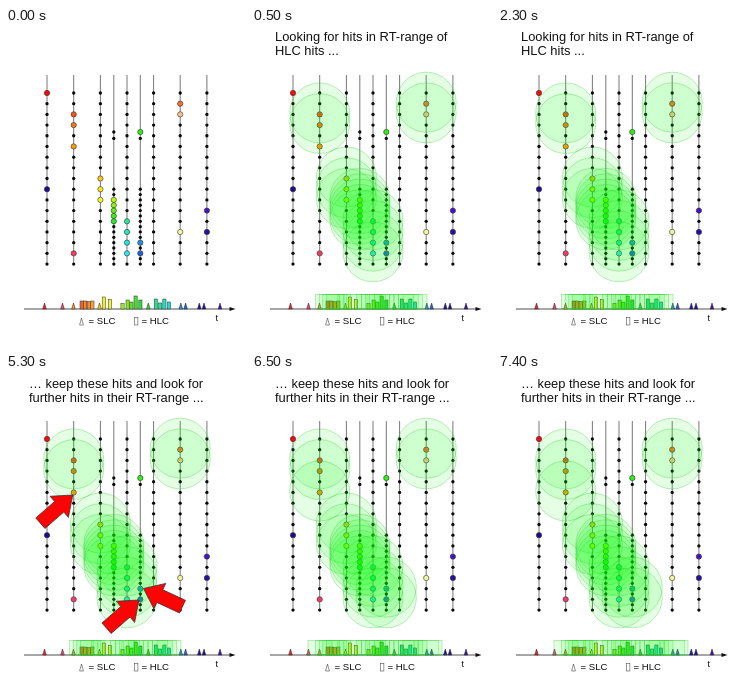
An HTML page that plays this animation: 240 px wide and 318 px high, repeating every 8000 ms.

```html
<!DOCTYPE html>
<html lang="en">
<head>
<meta charset="utf-8">
<title>RT-range hit cleaning</title>
<style>
html, body { margin: 0; width: 100%; height: 100%; overflow: hidden; background: #fff; }
svg { display: block; width: 100vw; height: 100vh; }
text { font-family: "Liberation Sans", Arial, sans-serif; fill: #111; }
</style>
</head>
<body>
<svg id="stage" viewBox="0 0 240 318"></svg>
<script>
const LOOP = 8000, LOOK = 500, KEEP = 3500, EXTEND = 6500;
const RANGE = 30, LIFT = 1.5, WINDOW = 12, AXIS = 281;
const stage = document.getElementById('stage');

function add(parent, tag, attrs, text) {
  const el = document.createElementNS('http://www.w3.org/2000/svg', tag);
  for (const k in attrs) el.setAttribute(k, attrs[k]);
  if (text) el.textContent = text;
  parent.appendChild(el);
  return el;
}
const group = () => add(stage, 'g', {});
const row = n => 65 + n * 10.69;

// Detector strings; the two dense ones have closely spaced modules
const columns = [41, 67.7, 94.4, 107.8, 121, 134.3, 147.6, 174.2, 200.9];
const dense = [3, 5];

// [column, row, colour, is HLC]
const hits = [
  [0, 0, '#fc0808'], [0, 9, '#1c0a90'],
  [1, 2, '#f8501c', 1], [1, 3, '#f87414', 1], [1, 5, '#fc9808'], [1, 15, '#f43a68'],
  [2, 8, '#fcc41c', 1], [2, 9, '#fce41c', 1], [2, 10, '#f8f820', 1],
  [3, 10, '#b4f810', 1], [3, 10.5, '#8cf410', 1], [3, 11, '#60f014', 1],
  [3, 11.5, '#40ec1c', 1], [3, 12, '#24e830', 1],
  [4, 12, '#20eca0', 1], [4, 13, '#20ecb8', 1], [4, 14, '#20e8d8', 1], [4, 15, '#30e4f0', 1],
  [5, 3.65, '#30f018'], [5, 14, '#2090e0'], [5, 15, '#2060e0'],
  [7, 1, '#f47030', 1], [7, 2, '#fac090', 1], [7, 13, '#f4f8a0'],
  [8, 11, '#4014c8'], [8, 13, '#2410a0']
].map(([c, r, fill, hlc]) => ({ x: columns[c], y: row(r), fill, hlc }));

// HLC pulses: [time, height, colour]
const bars = [
  [75.6, 8, '#f4602c'], [79.2, 8, '#f48030'], [82.8, 7.5, '#f88c24'], [86.4, 8, '#f8a040'],
  [97.8, 12, '#f0f020'], [104, 9.5, '#e8f428'],
  [116.5, 5.5, '#a0f020'], [121.6, 9, '#80ec20'], [125.4, 7, '#60e824'],
  [129.6, 13, '#40e428'], [134.4, 9, '#28e034'],
  [149.8, 10, '#20e490'], [154.2, 6, '#20e4a4'], [158.4, 10, '#20e0c0'], [163, 7, '#20d8e0']
];
// SLC pulses: [time, colour]
const spikes = [
  [38.5, '#f02020'], [56.5, '#f04070'], [67.5, '#f8902c'], [93.5, '#f8d020'], [142.3, '#34d430'],
  [174.8, '#2488dc'], [179.6, '#2860dc'], [193.3, '#2014a8'], [198, '#2010a0'], [214, '#3c14b4']
];

function triangle(parent, x, y, w, h, fill) {
  add(parent, 'path', { d: `M${x - w} ${y}L${x} ${y - h}L${x + w} ${y}Z`,
    fill, stroke: '#222', 'stroke-width': .5 });
}

function bar(parent, x, y, h, fill) {
  add(parent, 'rect', { x: x - 1.6, y: y - h, width: 3.2, height: h,
    fill, stroke: '#333', 'stroke-width': .5 });
}

function drawStrings(g) {
  columns.forEach((x, i) => {
    add(g, 'path', { d: `M${x} 47V237`, stroke: '#555', 'stroke-width': .8 });
    const dot = y => add(g, 'circle', { cx: x, cy: y, r: 1.65, fill: '#080808' });
    if (dense.includes(i)) {
      dot(row(3.65));
      dot(row(4.25));
      for (let n = 9; n <= 16; n += .5) dot(row(n));
    } else {
      for (let n = 0; n <= 16; n++) dot(row(n));
    }
  });
  hits.forEach(h => add(g, 'circle', { cx: h.x, cy: h.y, r: 2.65,
    fill: h.fill, stroke: '#333', 'stroke-width': .6 }));
}

function drawTimeline(g) {
  add(g, 'path', { d: `M18 ${AXIS}H225`, stroke: '#222', 'stroke-width': .8 });
  add(g, 'path', { d: `M229.5 ${AXIS}l-6 -2v4z`, fill: '#111' });
  bars.forEach(([t, h, fill]) => bar(g, t, AXIS, h, fill));
  spikes.forEach(([t, fill]) => triangle(g, t, AXIS, 1.8, 6, fill));
  add(g, 'text', { x: 209.5, y: 292.5, 'font-size': 9 }, 't');
  triangle(g, 75.5, 297, 1.9, 7, '#fff');
  bar(g, 130.3, 297, 7.5, '#fff');
  add(g, 'text', { x: 82.5, y: 296.2, 'font-size': 9.6 }, '= SLC');
  add(g, 'text', { x: 135.5, y: 296.2, 'font-size': 9.6 }, '= HLC');
}

const veil = { fill: '#00fa00', 'fill-opacity': .1,
  stroke: '#30c830', 'stroke-opacity': .55, 'stroke-width': .6 };

function drawRanges(g, points, times) {
  points.forEach(p => add(g, 'circle', { cx: p.x, cy: p.y - LIFT, r: RANGE, ...veil }));
  times.forEach(t => add(g, 'rect', { x: t - WINDOW, y: 266.5,
    width: 2 * WINDOW, height: AXIS - 266.5, ...veil }));
}

function arrow(g, x, y, angle) {
  add(g, 'path', { d: 'M0 0L-18 -14V-7H-43V7H-18V14Z',
    transform: `translate(${x} ${y}) rotate(${angle})`,
    fill: '#fc0404', stroke: '#333', 'stroke-width': .7 });
}

function title(y, lines) {
  const g = group();
  lines.forEach((s, i) => add(g, 'text', { x: 23, y: y + 13.8 * i, 'font-size': 12.9 }, s));
  return g;
}

const base = group();
drawStrings(base);
drawTimeline(base);

const ranges = group();
drawRanges(ranges, hits.filter(h => h.hlc), bars.map(b => b[0]));

const further = group();
const found = hits.filter(h => !h.hlc &&
  (h.x === columns[1] && h.y === row(5) || h.x === columns[5] && h.y > row(13)));
drawRanges(further, found, [68, 174.8, 178]);

const arrows = group();
arrow(arrows, 66.8, 121, -41);
arrow(arrows, 133, 226, -41);
arrow(arrows, 137.5, 214.5, 205);

const looking = title(13.3, ['Looking for hits in RT-range of', 'HLC hits ...']);
const keeping = title(13.7, ['… keep these hits and look for', 'further hits in their RT-range ...']);

const show = (el, on) => el.setAttribute('visibility', on ? 'visible' : 'hidden');

function render(t) {
  show(ranges, t >= LOOK);
  show(looking, t >= LOOK && t < KEEP);
  show(keeping, t >= KEEP);
  show(arrows, t >= KEEP && t < EXTEND);
  show(further, t >= EXTEND);
}

const start = performance.now();
function tick(now) {
  render(Math.max(0, now - start) % LOOP);
  requestAnimationFrame(tick);
}
render(0);
requestAnimationFrame(tick);
</script>
</body>
</html>
```
